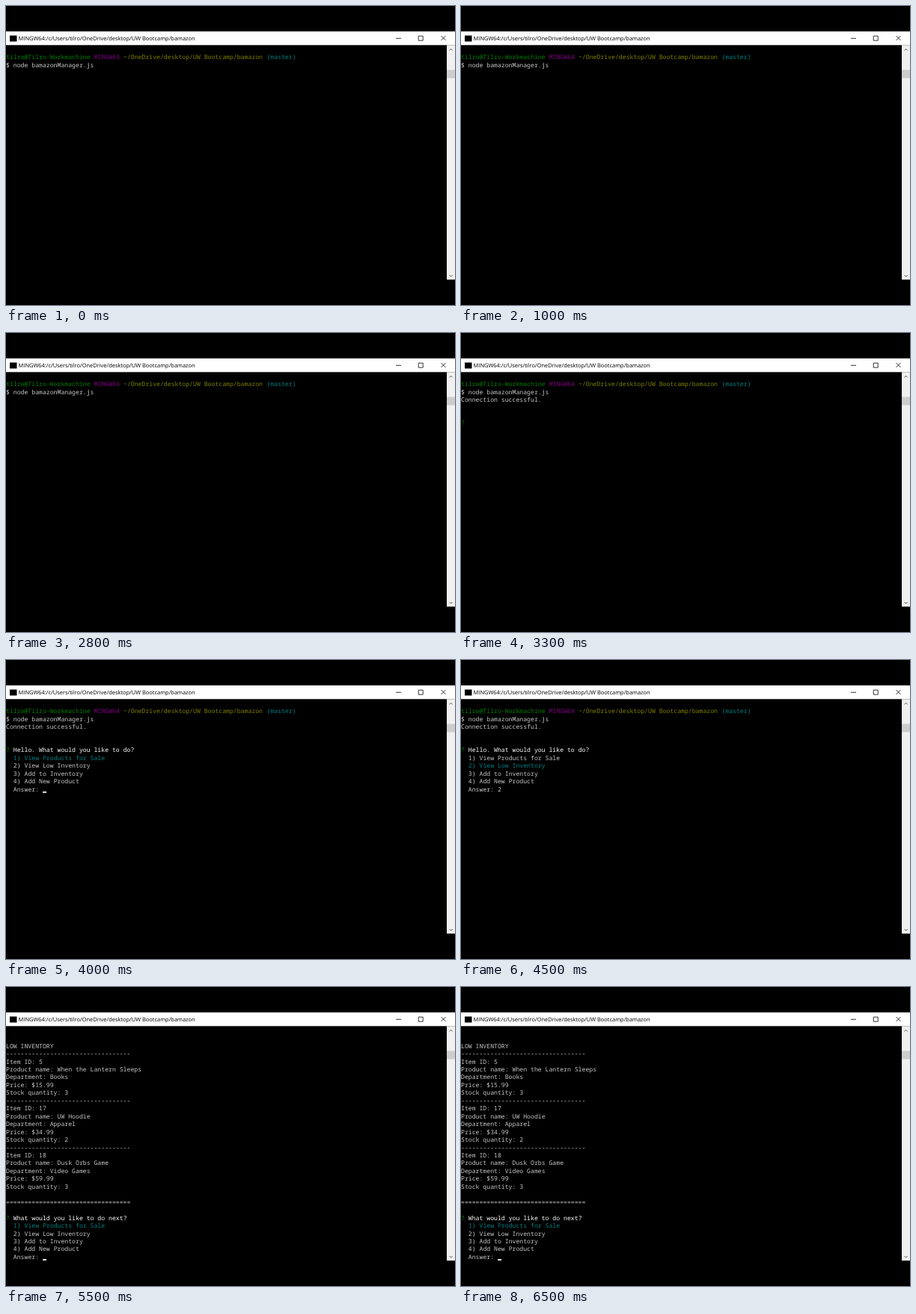
These frames come from a looping animation (600x400 px, 7100 ms). An HTML page:

```html
<!DOCTYPE html>
<html lang="en">
<head>
<meta charset="utf-8">
<title>Terminal</title>
<style>
  html, body { margin: 0; width: 100%; height: 100%; overflow: hidden; background: #000; }
  svg { display: block; width: 600px; height: 400px; }
  text { white-space: pre; text-rendering: geometricPrecision; }
  .term { font: 8.178px "Noto Sans Mono", monospace; fill: #c6c6c6; }
  .title { font: 7.45px "Open Sans", sans-serif; }
  .green { fill: #008000; }
  .magenta { fill: #800080; }
  .yellow { fill: #808000; }
  .cyan { fill: #008080; }
  .bright { fill: #fff; }

  .line { fill: none; stroke: #000; stroke-width: .8; }
  .arrow { fill: none; stroke: #505050; stroke-width: 1; }

  #shell, #connected, #mark, #menu, #typed, #report, #cursor, .first, .second {
    animation: 7.1s step-end infinite;
  }
  #shell { animation-name: shell; }
  #connected { animation-name: connected; }
  #mark { animation-name: mark; }
  #menu { animation-name: menu; }
  #typed { animation-name: typed; }
  #report { animation-name: report; }
  #cursor { animation-name: cursor; fill: #e8e8e8; }
  .first { animation-name: first; }
  .second { animation-name: second; }

  @keyframes shell { 0% { opacity: 1 } 64.788%, 100% { opacity: 0 } }
  @keyframes connected { 0% { opacity: 0 } 45.07% { opacity: 1 } 64.788%, 100% { opacity: 0 } }
  @keyframes mark { 0% { opacity: 0 } 46.478% { opacity: 1 } 64.788%, 100% { opacity: 0 } }
  @keyframes menu { 0% { opacity: 0 } 47.887% { opacity: 1 } 64.788%, 100% { opacity: 0 } }
  @keyframes typed { 0% { opacity: 0 } 59.154% { opacity: 1 } 64.788%, 100% { opacity: 0 } }
  @keyframes report { 0% { opacity: 0 } 64.788%, 100% { opacity: 1 } }
  @keyframes first { 0% { fill: #008080 } 59.154%, 100% { fill: #c6c6c6 } }
  @keyframes second { 0% { fill: #c6c6c6 } 59.154%, 100% { fill: #008080 } }

  /* The cursor blinks every half second and follows the input position. */
  @keyframes cursor {
    0%      { opacity: 0; transform: translate(122.7px, 81.8px) }
    2.816%  { opacity: 1; transform: translate(122.7px, 81.8px) }
    9.859%  { opacity: 0; transform: translate(122.7px, 81.8px) }
    16.901% { opacity: 1; transform: translate(122.7px, 81.8px) }
    23.943% { opacity: 0; transform: translate(0, 92.3px) }
    25.352% { opacity: 1; transform: translate(0, 92.3px) }
    28.168% { opacity: 0; transform: translate(0, 92.3px) }
    30.985% { opacity: 1; transform: translate(0, 92.3px) }
    38.028% { opacity: 0; transform: translate(49.1px, 175.8px) }
    54.929% { opacity: 1; transform: translate(49.1px, 175.8px) }
    59.154% { opacity: 1; transform: translate(54px, 175.8px) }
    61.971% { opacity: 0; transform: translate(54px, 175.8px) }
    64.788% { opacity: 1; transform: translate(49.1px, 363.9px) }
    70.422% { opacity: 0; transform: translate(49.1px, 363.9px) }
    77.464% { opacity: 1; transform: translate(49.1px, 363.9px) }
    84.507% { opacity: 0; transform: translate(49.1px, 363.9px) }
    91.549%, 100% { opacity: 1; transform: translate(49.1px, 363.9px) }
  }
</style>
</head>
<body>
<svg viewBox="0 0 600 400">
  <rect width="600" height="400"/>
  <rect y="34" width="600" height="18.3" fill="#fff"/>
  <rect x="5" y="39.5" width="9.5" height="8"/>
  <text class="title" x="16.6" y="46.3">MINGW64:/c/Users/tilro/OneDrive/desktop/UW Bootcamp/bamazon</text>
  <path class="line" d="M521 43.3h7M551.2 40.2h6v6h-6zM581.5 40l6 6m0-6l-6 6"/>
  <rect x="589" y="52.3" width="11" height="313.7" fill="#f0f0f0"/>
  <rect x="589" y="85.5" width="11" height="11" fill="#cdcdcd"/>
  <path class="arrow" d="M592.6 59.4l2-2 2 2M592.6 360l2 2 2-2"/>
  <g class="term">
    <g id="shell"></g>
    <g id="connected"></g>
    <g id="mark"></g>
    <g id="menu"></g>
    <g id="typed"></g>
    <g id="report"></g>
  </g>
  <rect id="cursor" width="4.9" height="2"/>
</svg>
<script>
  const SVG = "http://www.w3.org/2000/svg";
  const CHAR = 4.907, LINE = 10.456, BASELINE = 60.7;

  function print(id, row, text, style = "", col = 0) {
    const node = document.createElementNS(SVG, "text");
    node.setAttribute("x", col * CHAR);
    node.setAttribute("y", BASELINE + row * LINE);
    node.setAttribute("class", style);
    node.textContent = text;
    document.getElementById(id).append(node);
  }

  function printMenu(id, row, question, styles) {
    const options = ["View Products for Sale", "View Low Inventory", "Add to Inventory", "Add New Product"];
    print(id, row, question, "bright", 2);
    options.forEach((option, i) => print(id, row + 1 + i, `${i + 1}) ${option}`, styles[i], 2));
    print(id, row + 5, "Answer:", "", 2);
  }

  let col = 0;
  for (const [text, style] of [
    ["tilro@Tilro-Workmachine", "green"],
    ["MINGW64", "magenta"],
    ["~/OneDrive/desktop/UW Bootcamp/bamazon", "yellow"],
    ["(master)", "cyan"]
  ]) {
    print("shell", 1, text, style, col);
    col += text.length + 1;
  }
  print("shell", 2, "$ node bamazonManager.js");
  print("connected", 3, "Connection successful.");
  print("mark", 6, "?", "green");
  printMenu("menu", 6, "Hello. What would you like to do?", ["first", "second"]);
  print("typed", 11, "2", "", 10);

  const items = [
    [5, "When the Lantern Sleeps", "Books", "15.99", 3],
    [17, "UW Hoodie", "Apparel", "34.99", 2],
    [18, "Dusk Orbs Game", "Video Games", "59.99", 3]
  ];
  const lines = ["LOW INVENTORY"];
  for (const [id, name, department, price, stock] of items) {
    lines.push("-".repeat(34), `Item ID: ${id}`, `Product name: ${name}`,
      `Department: ${department}`, `Price: $${price}`, `Stock quantity: ${stock}`);
  }
  lines.push("", "=".repeat(34));
  lines.forEach((text, i) => print("report", 2 + i, text));
  print("report", 24, "?", "green");
  printMenu("report", 24, "What would you like to do next?", ["cyan"]);
</script>
</body>
</html>
```
